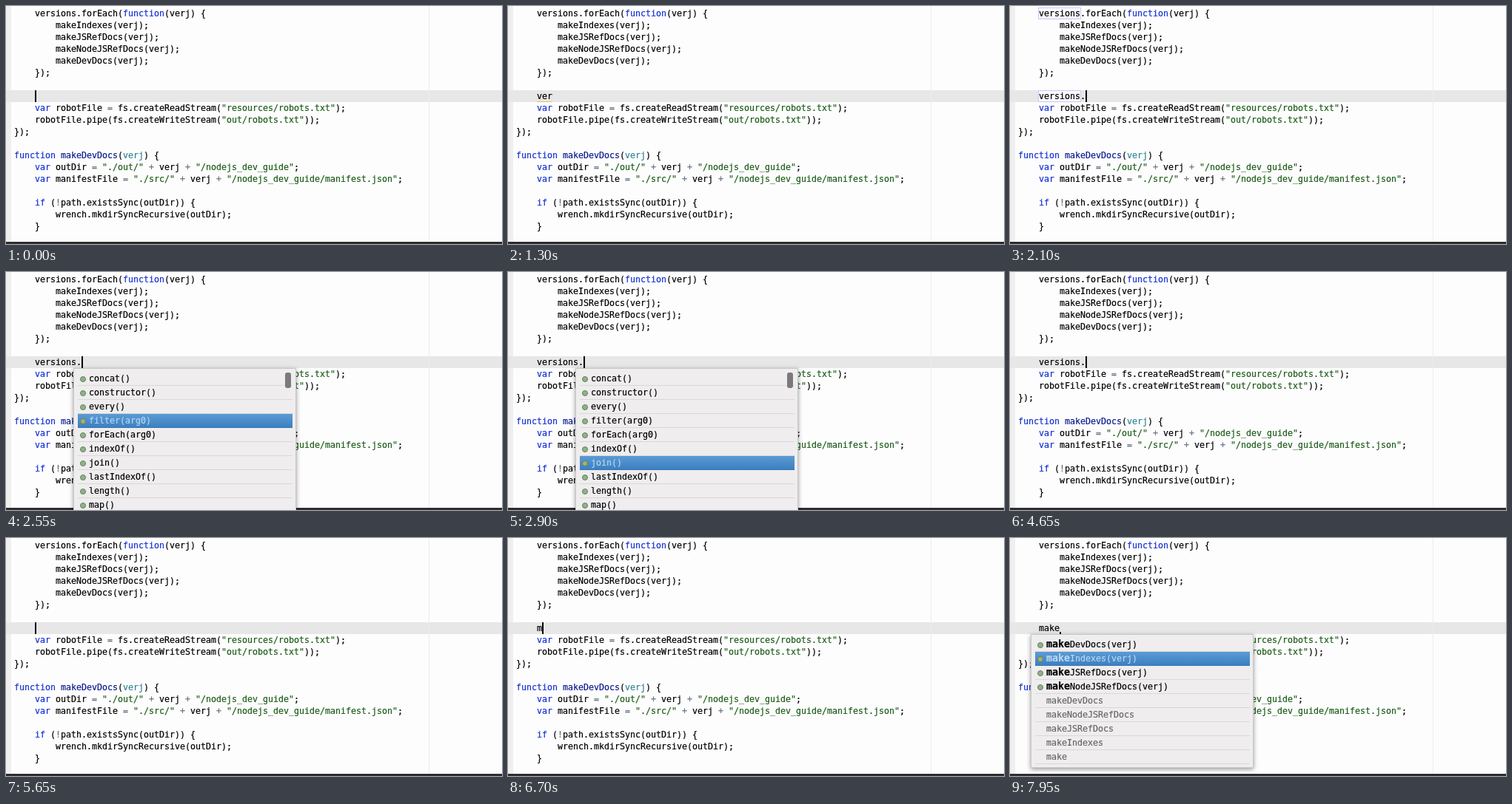
These frames come from a looping animation (670 by 322 pixels, 8000 ms). An HTML page:

```html
<!DOCTYPE html>
<html lang="en">
<head>
<meta charset="utf-8">
<title>Code completion</title>
<style>
html, body { margin: 0; width: 100%; height: 100%; overflow: hidden; }
#stage { position: relative; width: 670px; height: 322px; overflow: hidden; background: #fdfdfe;
  font: 11.63px/16px "DejaVu Sans Mono", monospace; color: #000; white-space: pre;
  -webkit-text-stroke: .2px; }
#stage div { position: absolute; box-sizing: border-box; }
#gutter { left: 0; top: 0; width: 7px; height: 322px; background: #efeff0; }
#margin { left: 571px; top: 0; width: 1px; height: 322px; background: #ececee; }
#active { left: 0; width: 670px; height: 16px; background: #e7e7e7; }
#bar { left: 0; top: 319px; width: 670px; height: 3px; background: #2d2d2f; }
#caret { width: 2px; background: #000; }
#warn { left: 39px; top: 129px; width: 21px; height: 1px; background: #e3c467; }
.line { left: 11px; height: 16px; }
.word { left: 38px; width: 58px; height: 16px; background: #fafaff; border: 1px solid #c8c8fa; }
.key { color: #1532d2; }
.str { color: #1d5c17; }
.op { color: #687687; }
.name { color: #0b1c8c; }
.arg { color: #318495; }
b { font-size: 13.3px; line-height: 1px; }
.popup { top: 130px; width: 301px; background: #efedee; border: 1px solid #cac8c9;
  box-shadow: 0 2px 6px rgba(0,0,0,.4); }
.row { left: 5px; width: 290px; height: 19px; padding-left: 15px; line-height: 19px;
  border-bottom: 1px solid #d9d7d8; }
.row.plain { color: #666; }
.row.on { color: #b9d6ef; background: linear-gradient(#5b9bd5, #3c80c1); border-color: #3a78b4; }
.row i { position: absolute; left: 3px; top: 6px; width: 8px; height: 8px; border-radius: 50%;
  box-sizing: border-box; border: 1px solid #64805f; background: #8fb287; }
.row.on i { background: #a5b268; }
.thumb { left: 285px; top: 5px; width: 8px; height: 21px; border-radius: 3px; background: #7b7979; }
#docs { left: 401px; top: 129px; width: 300px; height: 210px; background: #e9e7ea;
  border: 1px solid #c6c4c6; box-shadow: 0 2px 6px rgba(0,0,0,.4); }
#docs u { color: #1443cc; font-size: 11.63px; }
#docs small { font-size: 11.3px; }
</style>
</head>
<body>
<div id="stage"></div>
<script>
const CODE = `    versions.forEach(function(verj) {
        makeIndexes(verj);
        makeJSRefDocs(verj);
        makeNodeJSRefDocs(verj);
        makeDevDocs(verj);
    });


    var robotFile = fs.createReadStream("resources/robots.txt");
    robotFile.pipe(fs.createWriteStream("out/robots.txt"));
});

function makeDevDocs(verj) {
    var outDir = "./out/" + verj + "/nodejs_dev_guide";
    var manifestFile = "./src/" + verj + "/nodejs_dev_guide/manifest.json";

    if (!path.existsSync(outDir)) {
        wrench.mkdirSyncRecursive(outDir);
    }`.split("\n");

// The first "members" rows get an icon; the others are plain words.
const LISTS = {
  ver: { left: 28, members: 1, rows: ["versions", "versions", "verj"] },
  array: { left: 91, members: 12, thumb: true, rows: ["concat()", "constructor()", "every()", "filter(arg0)",
    "forEach(arg0)", "indexOf()", "join()", "lastIndexOf()", "length()", "map()", "pop()"] },
  make: { left: 28, members: 4, rows: ["makeDevDocs(verj)", "makeIndexes(verj)", "makeJSRefDocs(verj)",
    "makeNodeJSRefDocs(verj)", "makeDevDocs", "makeNodeJSRefDocs", "makeJSRefDocs", "makeIndexes", "make"] }
};

// [x, y of the line centre, markup]
const DOCS = [
  [407, 155, "Returns the last index at which a given"],
  [407, 171, "element can be found in the array, or -1"],
  [407, 187, "if it is not present. The array is"],
  [407, 203, "searched backwards, starting at"],
  [407, 219, "<small>fromIndex.</small>"],
  [494, 250, "<b>Method of <u>Array</u></b>"],
  [410, 272, "Implemented in"], [540, 272, "JavaScript 1.6"],
  [410, 292, "ECMAScript Edition"], [540, 292, "ECMAScript 5th Edition"],
  [407, 311, "<u>(more)</u>"]
];

// Each step changes part of the state: [ms, changes]
const STEPS = [
  [0, { text: "", caret: 16, list: null, row: 0, fade: 1, docs: false, words: false, warn: false, up: false }],
  [50, { text: "v" }],
  [200, { list: "ver", fade: .35 }],
  [250, { fade: .75 }],
  [300, { fade: 1 }],
  [1050, { text: "ver", caret: 0 }],
  [1300, { list: null, warn: true }],
  [1350, { text: "versions", warn: false }],
  [1400, { caret: 16 }],
  [1750, { words: true }],
  [2100, { text: "versions." }],
  [2350, { words: false, list: "array", fade: .5 }],
  [2400, { fade: 1 }],
  [2550, { row: 3 }],
  [2650, { row: 4 }],
  [2750, { row: 5 }],
  [2850, { row: 6 }],
  [2950, { row: 7, caret: 0 }],
  [3250, { docs: true }],
  [3500, { caret: 16 }],
  [3950, { caret: 0 }],
  [4250, { caret: 16 }],
  [4650, { list: null, docs: false, row: 0 }],
  [5250, { up: true }],
  [5650, { up: false, text: "" }],
  [6000, { caret: 0 }],
  [6700, { text: "m", caret: 16 }],
  [6800, { list: "make", fade: .5 }],
  [6850, { fade: 1 }],
  [6950, { text: "ma" }],
  [7150, { text: "mak" }],
  [7700, { text: "make", caret: 0 }],
  [7950, { row: 1, caret: 3 }]
];
const LOOP = 8000;
let state = {};
const states = STEPS.map(([ms, change]) => [ms, state = { ...state, ...change }]);

const box = (attrs, html = "") => `<div ${attrs}>${html}</div>`;
const at = (x, y, more = "") => `style="left:${x}px;top:${y}px;${more}"`;

const TOKENS = /(?<str>"[^"]*")|(?<key>\b(?:var|function|if)\b)|(?<name>(?<=function )\w+)|(?<arg>(?<=Docs\()verj(?=\) \{))|(?<op> [+=] |!)/g;
const paint = line => line.replace(TOKENS, (token, ...rest) => {
  const groups = rest.pop();
  const kind = Object.keys(groups).find(k => groups[k]);
  return `<span class="${kind}">${token}</span>`;
});

const codeHtml = CODE.map((line, i) => box(`class="line" ${at(11, 2 + 16 * i)}`, paint(line))).join("");
const docsHtml = box('id="docs"', DOCS.map(([x, y, html]) => box(at(x - 402, y - 138), html)).join(""));

function popup({ list, row, text, fade }) {
  const { left, members, rows, thumb } = LISTS[list];
  const prefix = list === "array" ? 0 : text.length;
  const body = rows.map((label, i) => {
    const member = i < members;
    const cut = member ? prefix : 0;
    const kind = `row${member ? "" : " plain"}${i === row ? " on" : ""}`;
    const start = cut ? `<b>${label.slice(0, cut)}</b>` : "";
    return box(`class="${kind}" style="top:${4 + 19 * i}px"`,
      (member ? "<i></i>" : "") + start + label.slice(cut));
  }).join("");
  return box(`class="popup" ${at(left, 130, `height:${rows.length * 19 + 10}px;opacity:${fade}`)}`,
    body + (thumb ? box('class="thumb"') : ""));
}

function render(s) {
  const lineTop = s.up ? 98 : 114;
  const caretX = 39 + 7 * s.text.length;
  return box('id="gutter"') + box(`id="active" ${at(0, lineTop)}`) + box('id="margin"') +
    (s.words ? box(`class="word" ${at(38, 2)}`) + box(`class="word" ${at(38, 114)}`) : "") +
    codeHtml + box(`class="line" ${at(39, 114)}`, s.text) +
    (s.warn ? box('id="warn"') : "") +
    box(`id="caret" ${at(caretX, lineTop + 16 - s.caret, `height:${s.caret}px`)}`) +
    box('id="bar"') + (s.list ? popup(s) : "") + (s.docs ? docsHtml : "");
}

const stage = document.getElementById("stage");
const start = performance.now();
let shown;
function tick() {
  const t = (performance.now() - start) % LOOP;
  const now = states.findLast(([ms]) => ms <= t)[1];
  if (now !== shown) stage.innerHTML = render(shown = now);
  requestAnimationFrame(tick);
}
tick();
</script>
</body>
</html>
```
